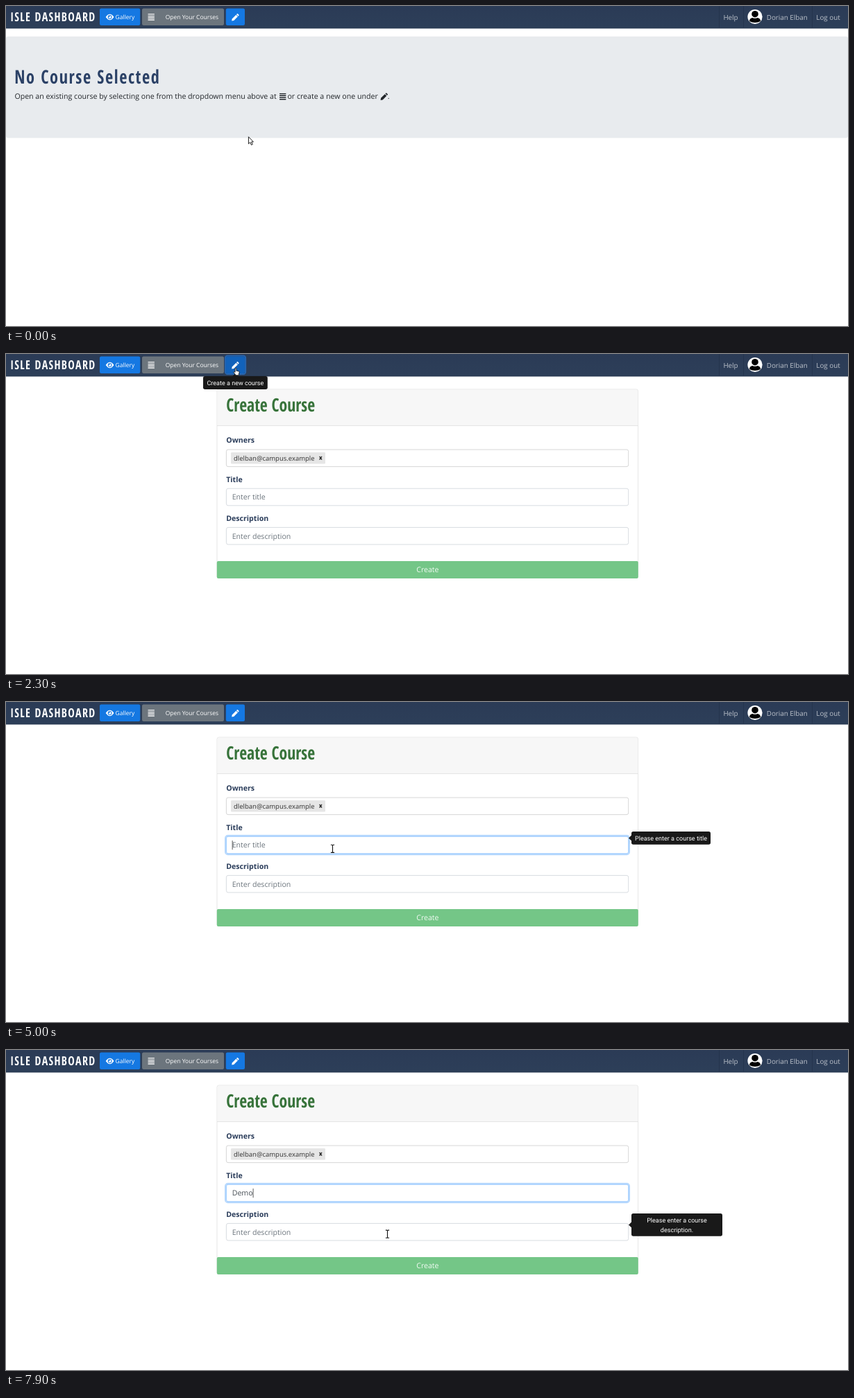
An HTML page that plays this animation: 1213 px wide and 462 px high, repeating every 8000 ms.

```html
<!DOCTYPE html>
<html lang="en">
<head>
<meta charset="utf-8">
<title>Create a course</title>
<style>
  html, body { margin: 0; width: 100%; height: 100%; overflow: hidden; background: #fff; }
  svg { display: block; width: 100%; height: 100%; }
  text { font-family: "Open Sans", "Noto Sans", sans-serif; font-size: 10.62px; white-space: pre; text-rendering: geometricPrecision; }
  .head { font-family: "Open Sans Condensed", "Open Sans", sans-serif; font-stretch: condensed; font-weight: 700; }
  .label { font-weight: 700; fill: #2a3c5a; }
  .hint { fill: #6c757d; }
  .button { font-size: 8.5px; fill: #fff; }
  .nav { font-size: 9.8px; fill: #bcc2cb; }
  .tip text { font-family: Roboto, "Open Sans", sans-serif; font-size: 9.04px; fill: #fff; text-anchor: middle; }
</style>
</head>
<body>
<svg id="stage" viewBox="0 0 1213 462" preserveAspectRatio="none"></svg>
<script>
const LOOP = 8000;
const NARROW = .893; // headings use a face slimmer than the condensed one
const stage = document.getElementById('stage');

// Markup helpers
const text = (x, y, str, attrs = '') => `<text x="${x}" y="${y}" ${attrs}>${str}</text>`;
const rect = (x, y, w, h, fill, attrs = '') =>
  `<rect x="${x}" y="${y}" width="${w}" height="${h}" fill="${fill}" ${attrs}/>`;
const path = (d, attrs) => `<path d="${d}" ${attrs}/>`;
const head = (x, y, str, size, fill, spacing = 0) =>
  `<text class="head" transform="translate(${x} ${y}) scale(${NARROW} 1)"
    letter-spacing="${spacing / NARROW}" style="font-size:${size}px" fill="${fill}">${str}</text>`;

const listIcon = (x, y, fill) =>
  [0, 2.7, 5.4, 8.1].map(dy => rect(x, y + dy, 9.4, 1.4, fill, 'rx=".3"')).join('');
const pencil = (x, y, fill) => `<g transform="translate(${x} ${y}) scale(1.05)" fill="${fill}">` +
  path('M0 10L.5 7.1 5.9 1.7 8.3 4.1 2.9 9.5Z', '') +
  path('M6.5 1.1L7.3 .3Q7.8 -.2 8.3 .3L9.7 1.7Q10.2 2.2 9.7 2.7L8.9 3.5Z', '') + '</g>';
const input = (y, id) =>
  rect(317.4, y, 579.3, 24.6, '#fff', `id="${id}" rx="2.6" stroke="#ced4da" stroke-width=".8"`);

function tip(id, x, y, w, h, lines, arrow) {
  const first = y + h / 2 + 3.3 - (lines.length - 1) * 6.8;
  return `<g id="${id}" class="tip">` + rect(x, y, w, h, '#191919', 'rx="2.7"') +
    path(arrow, 'fill="#191919"') +
    lines.map((s, i) => text(x + w / 2, first + i * 13.6, s)).join('') + '</g>';
}
const leftArrow = y => `M897 ${y}L901.2 ${y - 4.2}V${y + 4.2}Z`;

const navbar =
  rect(0, 0, 1213, 32.3, 'url(#bar)') + rect(0, 31.5, 1213, .8, '#25344c') +
  head(6.2, 22.4, 'ISLE DASHBOARD', 17.9, '#fff', 1.33) +
  rect(135, 3.4, 58.3, 24.6, '#1578e2', 'rx="2.2"') +
  path('M143.7 16Q149.6 7.6 155.5 16Q149.6 24.4 143.7 16Z', 'fill="#fff"') +
  '<circle cx="149.6" cy="16" r="3" fill="#1578e2"/><circle cx="149.6" cy="16" r="2" fill="#fff"/>' +
  '<circle cx="148.8" cy="15.2" r=".9" fill="#1578e2"/>' +
  text(157.6, 19.3, 'Gallery', 'class="button"') +
  rect(196, 3.4, 118, 24.6, '#6c757d', 'rx="2.2"') + listIcon(204.5, 11.2, '#fff') +
  text(229.7, 19.3, 'Open Your Courses', 'class="button"') +
  rect(315.9, 2.4, 29.2, 26.6, 'none', 'id="pencilRing" rx="3.2" stroke="#2381ec" stroke-width="2"') +
  rect(316.8, 3.4, 27.2, 24.6, '#1578e2', 'id="pencilButton" rx="2.2"') +
  pencil(325.2, 11, '#fff') +
  [1027, 1062, 1161].map(x => rect(x, 0, .8, 31.5, '#24334b')).join('') +
  text(1033.4, 19.6, 'Help', 'class="nav"') +
  '<circle cx="1079" cy="15.5" r="10.6" fill="#fff"/><circle cx="1079" cy="11.7" r="4.8" fill="#000"/>' +
  path('M1070.9 22.1Q1071.2 17.2 1075.6 16.9Q1079 18.6 1082.4 16.9Q1086.8 17.2 1087.1 22.1Q1079 26 1070.9 22.1Z', 'fill="#000"') +
  text(1095.8, 19.6, 'Dorian Elban', 'class="nav"') +
  text(1167.3, 19.6, 'Log out', 'class="nav"');

const welcome = '<g id="welcome">' + rect(0, 44, 1213, 146.5, '#e8ebee', 'rx="3.2"') +
  head(12.2, 112, 'No Course Selected', 27.2, '#2b4166', 1.6) +
  text(12.4, 134.4, 'Open an existing course by selecting one from the dropdown menu above at', 'fill="#212529"') +
  listIcon(394, 125.9, '#212529') +
  text(405.4, 134.4, 'or create a new one under', 'fill="#212529"') +
  pencil(539.6, 125.4, '#212529') + text(549.8, 134.4, '.', 'fill="#212529"') + '</g>';

const form = '<g id="form">' +
  rect(304, 51, 606.6, 272.6, '#fff', 'id="card" rx="2.7" stroke="#dfdfdf" stroke-width=".8"') +
  path('M304.4 103.2V54Q304.4 51.4 307 51.4H907.6Q910.2 51.4 910.2 54V103.2Z', 'fill="#f7f7f7"') +
  rect(304, 103, 606.6, .8, '#dfdfdf') +
  head(317.2, 83, 'Create Course', 26.56, '#37733a') +
  text(317.2, 128.4, 'Owners', 'class="label"') + input(138, 'owners') +
  rect(324, 142, 136, 16.6, '#e6e6e6', 'rx="1.3"') +
  text(328, 153.6, 'dlelban@campus.example', 'style="font-size:9.5px" fill="#333"') +
  path('M451.6 147.9L455 152.5M455 147.9L451.6 152.5', 'stroke="#222" stroke-width="1.3"') +
  text(317.2, 184.8, 'Title', 'class="label"') +
  rect(316, 192.9, 582, 27.2, 'none', 'id="titleRing" rx="3.6" stroke-width="2.1"') +
  input(194.2, 'title') +
  text(325.7, 210.2, 'Enter title', 'id="titleHint" class="hint"') +
  text(325.7, 210.2, '', 'id="typed" fill="#495057"') +
  rect(0, 200, .8, 13.2, '#333', 'id="caret"') +
  text(317.2, 230.6, 'Title must be at least three characters', 'id="error" style="font-size:8.5px" fill="#dc3545"') +
  '<g id="lower">' +
  text(317.2, 241.2, 'Description', 'class="label"') + input(250.4, 'description') +
  text(325.7, 266.6, 'Enter description', 'class="hint"') +
  rect(303.8, 299, 607, 25, '#74c687', 'rx="2"') +
  text(607.4, 315.1, 'Create', 'fill="#f1faf3" text-anchor="middle"') +
  '</g></g>';

const tips =
  tip('tipCreate', 284, 32, 92.8, 19, ['Create a new course'], 'M330.4 28L326.2 32.2H334.6Z') +
  tip('tipOwners', 901, 116.8, 131, 46.2,
    ['Enter list of email addresses', 'denoting the administrators', 'for this course'], leftArrow(140)) +
  tip('tipTitle', 901, 187, 114, 18.8, ['Please enter a course title'], leftArrow(196.4)) +
  tip('tipDescription', 901, 236, 131, 32.8, ['Please enter a course', 'description.'], leftArrow(252.4));

const beam = 'M-2.6 -5.6H-1Q0 -5.6 0 -4.6Q0 -5.6 1 -5.6H2.6M0 -4.6V4.6M-2.6 5.6H-1Q0 5.6 0 4.6Q0 5.6 1 5.6H2.6';
const cursors =
  '<g id="arrow">' + path('M.4 .8V11L2.8 8.8 4.4 12.6 6.2 11.8 4.6 8.1H7.4Z',
    'fill="#fff" stroke="#111" stroke-width=".95" stroke-linejoin="round"') + '</g>' +
  '<g id="hand">' + path('M-.9 6.3V1.2Q-.9 .3 0 .3T.9 1.2V4.2L4.1 4.9Q5.2 5.2 5.1 6.5L4.4 9V10.8H-.6V9.4L-3 6.7Q-3.3 5.7-2.2 5.6Z',
    'fill="#fff" stroke="#111" stroke-width=".85" stroke-linejoin="round"') + '</g>' +
  '<g id="beam" fill="none">' + path(beam, 'stroke="#fff" stroke-width="2.2"') +
  path(beam, 'stroke="#111" stroke-width="1.1"') + '</g>';

stage.innerHTML = '<defs><linearGradient id="bar" x2="0" y2="1"><stop stop-color="#2b3b56"/>' +
  '<stop offset="1" stop-color="#2d3f59"/></linearGradient></defs>' +
  rect(0, 0, 1213, 462, '#fff') + navbar + welcome + form + tips + cursors;

const el = {};
stage.querySelectorAll('[id]').forEach(node => el[node.id] = node);

// Each track lists [start time, value...]; a value holds until the next start.
const tracks = {
  tipCreate: [[0, 0], [1600, .3], [1700, .7], [1800, 1], [3000, .5], [3200, 0]],
  tipOwners: [[0, 0], [3400, .26], [3600, 1], [4400, 0]],
  tipTitle: [[0, 0], [4400, 1], [7500, 0]],
  tipDescription: [[0, 0], [7700, .35], [7900, 1]],
  pencilRing: [[0, 0], [2300, .6], [2400, .75], [4800, .35], [5000, 0]],
  titleRing: [[0, 0], [4800, .5], [5000, 1]]
};
const pencilFill = [[0, '#1578e2'], [1500, '#1369c6'], [2200, '#1262ba'], [3000, '#1578e2']];
const typing = [[0, ''], [5400, 'D'], [5800, 'De'], [6000, 'Dem'], [6200, 'Demo']];
const pointer = [
  [1400, 335, 41, 'arrow'], [1500, 333, 30, 'arrow'], [1600, 332, 25, 'hand'],
  [1700, 331.3, 22, 'hand'], [1800, 331, 20, 'hand'], [3000, 384, 46, 'arrow'],
  [3200, 446, 92, 'arrow'], [3400, 471, 128, 'arrow'], [3600, 471, 133, 'arrow'],
  [4000, 471, 163, 'arrow'], [4400, 470.5, 211, 'beam'], [4600, 470.5, 211.8, 'beam'],
  [7500, 548, 277, 'arrow'], [7700, 550, 266.6, 'beam'], [7900, 549.5, 265.7, 'beam']
];
const at = (track, t) => track.reduce((now, step) => step[0] <= t ? step : now);
const show = (node, on) => node.style.display = on ? '' : 'none';

function pointerAt(t) {
  if (t >= 1400) return at(pointer, t).slice(1);
  const k = Math.min(9, Math.max(0, Math.floor(t / 100) - 4)) / 9;
  return [349 + 20 * k - 31 * k * k, 188 - 134 * k, 'arrow'];
}

function draw(t) {
  for (const id in tracks) el[id].setAttribute('opacity', at(tracks[id], t)[1]);
  el.pencilButton.setAttribute('fill', at(pencilFill, t)[1]);
  show(el.welcome, t < 2300);
  show(el.form, t >= 2300);

  const typed = at(typing, t)[1];
  const invalid = typed.length > 0 && typed.length < 3;
  const red = invalid && t >= 5800;
  el.typed.textContent = typed;
  show(el.titleHint, !typed);
  show(el.caret, t >= 4800);
  el.caret.setAttribute('x', 325.7 + (typed ? el.typed.getComputedTextLength() : 0));
  el.titleRing.setAttribute('stroke', red ? '#f6cdd1' : '#b8d9fd');
  el.title.setAttribute('stroke', red ? '#dc3545' : t >= 4800 ? '#80bdff' : '#ced4da');
  el.owners.setAttribute('stroke', t >= 4000 && t < 4400 ? '#b3b3b3' : '#cccccc');

  const shift = invalid ? 15.4 : 0;
  show(el.error, invalid);
  el.lower.setAttribute('transform', `translate(0 ${shift})`);
  el.card.setAttribute('height', 272.6 + shift);

  const [x, y, kind] = pointerAt(t);
  for (const id of ['arrow', 'hand', 'beam']) show(el[id], id === kind);
  el[kind].setAttribute('transform', `translate(${x} ${y})`);
}

const start = performance.now();
function tick() {
  draw((performance.now() - start) % LOOP);
  requestAnimationFrame(tick);
}
tick();
</script>
</body>
</html>
```
